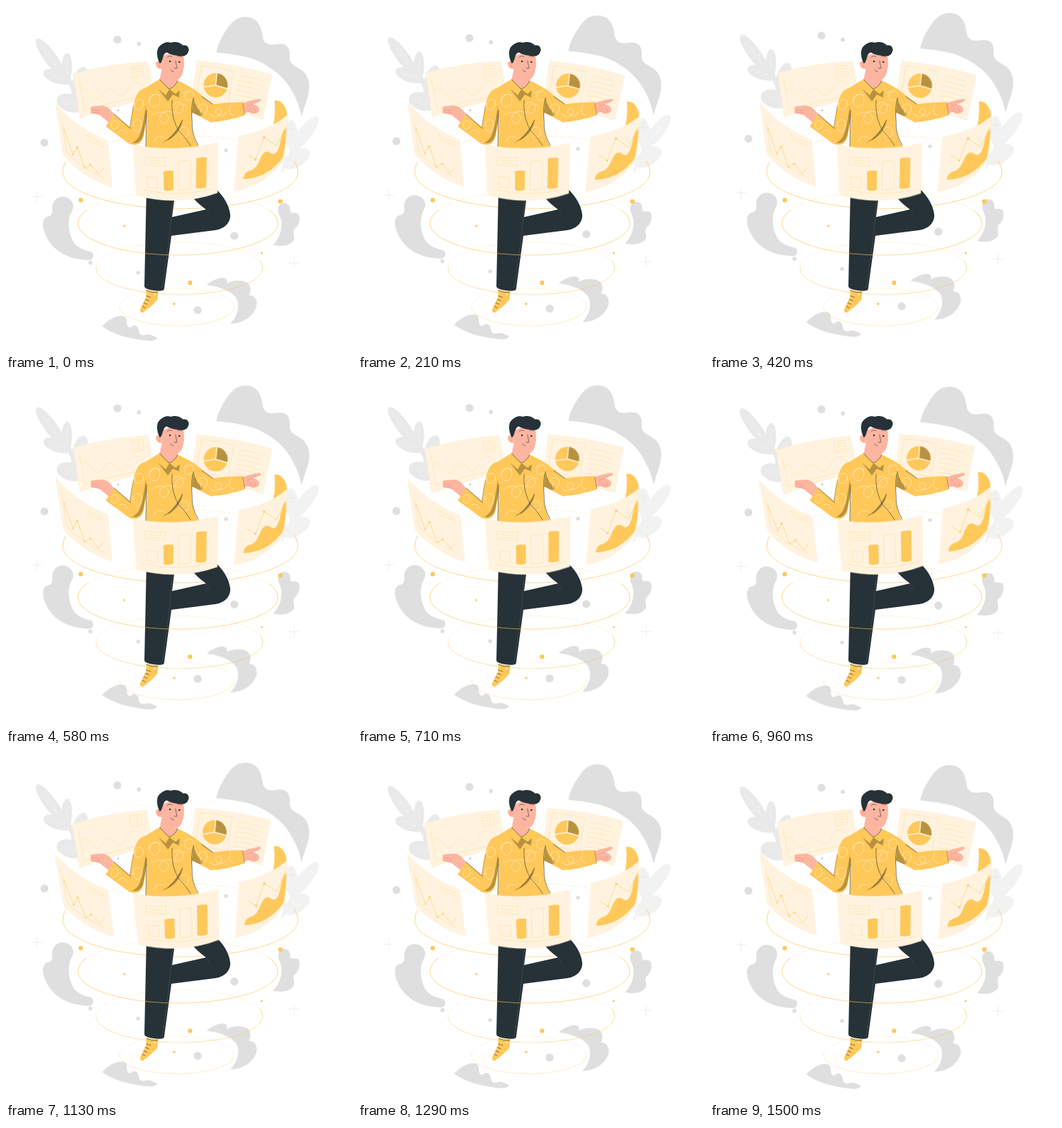
Animation, 500 px wide and 500 px high, one loop 1540 ms. Source, as an HTML page:

```html
<!DOCTYPE html>
<html lang="en">
<head>
<meta charset="utf-8">
<title>Floating data panels</title>
<style>
html, body { margin: 0; width: 100%; height: 100%; overflow: hidden; background: #fff; }
svg { display: block; width: 100vw; height: 100vh; fill: none; stroke-linecap: round; stroke-linejoin: round; }
.float { animation: float 770ms cubic-bezier(.37, 0, .63, 1) -65ms infinite alternate; }
.sway { transform-box: view-box; transform-origin: 239px 179px; animation: sway 770ms cubic-bezier(.37, 0, .63, 1) -470ms infinite alternate; }
@keyframes float { from { transform: translateY(.2px); } to { transform: translateY(-8.2px); } }
@keyframes sway { from { transform: rotate(-1.35deg); } to { transform: rotate(.7deg); } }
.gray { fill: #dfdfdf; }
.gold { fill: #ffc85a; }
.shade { fill: #b8923f; }
.dark { fill: #263238; }
.skin { fill: #fdb5a0; }
.crease { stroke: #e58f7c; stroke-width: .6; }
.cream { fill: #fff3e0; stroke: #ffe9c4; stroke-width: .5; }
.pale { stroke: #ffdf9f; stroke-width: .7; }
.rich { stroke: #ffcb66; stroke-width: .7; }
.ink { stroke: #263238; stroke-width: .6; }
.curl { stroke: #fff0cf; stroke-width: .7; }
.cross { stroke: #dedede; stroke-width: .5; }
.ring { stroke: #fac452; stroke-width: .65; }
.back { stroke: #ffe7bb; stroke-width: .5; stroke-dasharray: 14 3; }
</style>
</head>
<body>
<svg viewBox="0 0 500 500">
<defs>
  <g id="leaf">
    <path d="M0 2C-13-4-13-28-6-37Q0-43 6-37C13-28 13-4 0 2Z"/>
    <path d="M0 0V-33M0-12l-5-6M0-12l5-6M0-21l-4-5M0-21l4-5" stroke="#fff" stroke-width=".25"/>
  </g>
  <path id="plus" d="M-8 0H8M0-8V8" class="cross"/>
</defs>

<g class="float">
  <g fill="#e9e9e9">
    <use href="#leaf" transform="translate(84 102) rotate(-36) scale(.85 1.68)"/>
    <use href="#leaf" transform="translate(87 112) rotate(2) scale(.72 1.1)"/>
    <use href="#leaf" transform="translate(94 109) rotate(-71) scale(.9 1.05)"/>
    <use href="#leaf" transform="translate(99 132) rotate(18) scale(.95 1.15)"/>
    <use href="#leaf" transform="translate(114 146) rotate(-74) scale(1.2 1.05)"/>
    <path d="M78 88Q96 116 115 152" stroke="#e9e9e9" stroke-width="6"/>
  </g>
  <g fill="#f2f2f2">
    <use href="#leaf" transform="translate(412 209) rotate(38) scale(.9 1.55)"/>
    <use href="#leaf" transform="translate(413 207) rotate(-2) scale(.85 1.07)"/>
    <use href="#leaf" transform="translate(402 232) rotate(57) scale(1.1 1.07)"/>
    <path d="M418 200Q407 218 399 240" stroke="#f2f2f2" stroke-width="3"/>
  </g>
  <g class="gray">
    <path d="M304 67C306 54 314 40 323 28C332 16 345 13 357 18C367 23 370 35 371 46C374 56 382 57 393 55C407 53 411 62 410 75C410 86 421 87 430 95C439 104 440 117 436 131C433 142 429 151 427 160C424 142 416 125 404 109C392 94 371 80 349 74Q327 69 304 67Z"/>
    <path d="M82 275.5C94 276 101 287 95 297C88 310 90 327 97 340C102 350 115 353 123 355C128 358 127 366 121 367C100 367 80 361 66 345C54 330 49 311 58 305C70 303 66 297 67 288C69 280 75 275.5 82 275.5Z"/>
    <path d="M402 285C393 285 391 295 396 304C401 318 397 334 386 345C396 348 411 347 416 338C418 332 413 328 417 322C423 318 426 308 423 301C420 297 413 300 411 298C411 290 409 285 402 285Z"/>
    <path d="M290 403C297 397 308 392 315 393C320 394 320 398 319 401C326 396 341 395 349 400C355 406 354 412 351 418C359 417 364 425 362 434C358 447 344 459 324 459C335 448 339 432 332 421C323 410 306 405 290 403Z"/>
    <path d="M139 463C149 451 165 445 172 449C177 453 172 462 179 465C185 459 191 462 192 469C193 477 197 476 203 475C208 473 212 477 218.500 479C216 485 207 484 199 483C176 480 156 475 139 463Z"/>
    <circle cx="161" cy="48.500" r="5.800"/><circle cx="192" cy="54.500" r="2.900"/>
    <circle cx="55.500" cy="197.500" r="5.700"/><circle cx="318" cy="208.500" r="2.800"/>
    <circle cx="330" cy="332" r="5.800"/><circle cx="122" cy="371" r="2.900"/>
    <circle cx="191" cy="385.500" r="2.800"/><circle cx="277" cy="439.500" r="5.800"/>
  </g>
  <use href="#plus" x="44.500" y="275.500"/>
  <use href="#plus" x="416.500" y="371.500"/>
  <use href="#plus" x="412.500" y="178"/>
</g>

<g class="back">
  <path d="M82 240A170 53 0 0 1 422 240"/>
  <path d="M104 314A144.500 46 0 0 1 393 314"/>
  <path d="M130 379A120.500 38 0 0 1 371 379"/>
  <path d="M164 435A83 27 0 0 1 330 435"/>
</g>

<g class="sway">
  <path class="cream" d="M97 98Q150 84 205 80L214 132Q160 143 107 162Z"/>
  <g class="pale">
    <path d="M106 109L114 151Q155 137 201 131M110 122C118 112 124 134 132 134C142 134 141 119 150 120C158 121 158 131 166 130C176 129 175 110 186 110C193 109 196 113 200 117"/>
    <path d="M181 88L197 86L199 101L183 104ZM184 92l10-2M185 96l10-2M186 100l10-2"/>
  </g>
  <path class="cream" d="M276 79Q332 84 384 99L371 164Q322 147 268 140Z"/>
  <path class="pale" d="M283 86Q307 88 329 94L321 142Q300 137 275 134ZM337 101q17 1 32 7M335 108q17 1 32 7M334 115q17 1 32 7M333 122q17 1 32 7M332 129q17 1 32 7M330 136q17 1 25 5"/>
  <circle class="gold" cx="303" cy="114.500" r="17.500"/>
  <path class="shade" d="M303 114.500L305 97A17.500 17.500 0 0 1 319.500 119Z"/>
  <path d="M286 117L303 114.500L305 96.500M303 114.500L320 119.500" stroke="#fff3e0" stroke-width="1.500"/>
</g>

<path class="ring" d="M86 225Q82 232 82 240A170 53 0 0 0 422 240Q422 232 417 224"/>

<!-- person -->
<path class="dark" d="M203 265L200 405Q200 409 213 411Q228 413 228.500 409L239 332L302 324C317 322 325 312 324 301C322 286 314 275 304 265L262 268Q277 286 289 294L240 305L245 265Z"/>
<path d="M240.500 281Q236 345 226 407" stroke="#4b5a61" stroke-width=".5"/>
<path d="M289 295Q296 299 291 303" stroke="#46535a" stroke-width=".5"/>
<path class="gold" d="M203 410Q212 413 220 412L219 424Q212 433 198 443Q193 444 194 438L202 422Z"/>
<path class="ink" d="M203 419l6 2M201 424l6 2M199 429l5 2M197 434l4 2M203 411q8 4 16 3"/>
<circle cx="215" cy="417" r="1.200" fill="#fff2de"/>

<path class="skin" d="M158 159C151 149 146 144 138 144L124 145Q121 147 123 149L122 153Q122 156 126 155L136 158L148 168Z"/>
<path class="crease" d="M124 150L135 151M125 155l10-1"/>
<path class="skin" d="M340 141L352 137L366 134Q370 135 367 138L357 142Q365 144 366 149Q366 154 361 155Q356 157 351 153L341 156Z"/>
<path class="crease" d="M357 142L348 145M358 147l3 6M353 148l3 5M349 149l2 4"/>

<path class="gold" d="M218 108L202 118C190 121 187 130 184 145Q181 160 179 175L156 156L144 174L178 199C188 203 196 200 199 188L204 160L202 207H281C270 192 267 174 269 154L296 168Q321 166 345 158L342 139Q319 139 299 142L274 122Q267 117 251 109Z"/>
<path class="shade" d="M202 144C200 160 198 173 193 187Q190 194 182 198Q194 200 198 188Q202 171 203 158ZM271 132Q274 149 286 157L280 159L269 154ZM225 198C239 190 248 179 255 164C254 181 242 192 225 198Z"/>
<g class="curl">
  <path d="M205 138c4-16 20-12 17 0s-16 10-14-3c2-8 12-9 15-5M210 158c14-10 28-2 24 7s-16 3-11-6c4-8 16-9 22-3"/>
  <path d="M257 126c11-9 20 3 11 9s-15-7-5-10M240 146c2-10 18-9 16 2s-14 8-10-1c2-5 9-7 14-4M250 184c-2-12 14-12 14-2s-11 10-12 1"/>
  <path d="M189 136c8-5 14 7 6 12s-12-4-7-9M183 173c1-13 15-11 13 1s-13 9-11-2M151 170c8-10 16 0 9 6s-10-3-6-6M161 184q8-10 14 0"/>
  <path d="M278 148c2-12 16-7 12 3s-12 5-8-2M294 156q12 11 17-3c1-7-8-6-8 0s12 8 18-2M325 143q-7 12 5 15M213 196q6-12 14-6"/>
</g>
<path class="ink" d="M203 151L202 205M271 132Q267 146 269 167Q268 186 278 201M156 156L180 177M240 136Q238 164 251 182Q261 192 267 202M235 193Q248 181 255 165M299 142L283 131"/>
<path d="M184 145Q181 160 179 176M342 140l3 17" stroke="#8c7130" stroke-width=".6"/>

<path class="skin" d="M225 92L222 107Q228 112 234 120Q242 118 248 109V98Z"/>
<path class="gold" d="M222 106L217 109L222 120L231 129L236 120Q229 114 222 106ZM236 120Q244 117 248 108L254 114L250 128Z"/>
<path class="shade" d="M231 129L236 120L245 127L251 122L250 132L241 128L234 138L220 120Z"/>
<path class="ink" d="M222 106Q229 114 236 120Q245 116 248 108" stroke-width=".5"/>
<path class="skin" d="M225 74Q237 65 256 71C259 82 257 94 253 102Q249 108 241 107C232 106 227 98 225 91C219 92 215 86 217 81Q220 78 225 82Z"/>
<path class="dark" d="M222 83C217 72 217 63 222 58C227 54 231 51 238 53C247 50 253 54 256 57C263 55 266 63 263 67C261 73 254 73 249 72Q239 71 232 67C227 69 227 76 224 82Z"/>
<circle class="dark" cx="237" cy="80" r="1.300"/><circle class="dark" cx="250.500" cy="81" r="1.300"/>
<path class="ink" d="M233 74Q236 71 240 73M248 73Q252 71 254 74M238 92Q239 95 242 95" stroke-width="1"/>
<path class="ink" d="M245 79Q246 85 247 90L243 90"/>
<path class="crease" d="M219 83Q222 83 222 88"/>
<circle class="dark" cx="162" cy="151" r=".700"/>

<g class="sway">
  <path class="cream" d="M72 142Q104 178 147 195L153.500 262Q109 247 83 216Z"/>
  <path class="pale" d="M80 164L88 212Q112 236 142 249M114 186Q127 194 140 199M119 194Q129 199 141 203"/>
  <path class="rich" d="M84 179L97 215L103 204L114 234L122 229L134 243L141 235"/>
  <g class="gold">
    <circle cx="84" cy="179" r="1"/><circle cx="97" cy="215" r="1"/><circle cx="103" cy="204.500" r="1.400"/>
    <circle cx="114" cy="234" r="1"/><circle cx="122" cy="229" r="1.300"/>
    <path d="M388 137C398 134 408 148 405.500 161L386 174Q390 154 388 137Z"/>
  </g>
  <path class="cream" d="M337 188Q378 181 406 158Q407 190 401 222Q375 260 330 267Z"/>
  <path class="gold" d="M343 250C345 238 351 239 357 236C366 231 366 217 374 211C382 207 384 219 391 211C398 202 396 183 405 176Q405 199 400 219C385 239 367 249 343 250Z"/>
  <path class="rich" d="M348 214L360.500 222L373 190L391 202L404 174"/>
  <circle class="gold" cx="360.500" cy="222" r="1.500"/><circle class="gold" cx="373" cy="190" r="1.700"/>

  <path class="cream" d="M184 201Q245 212 306 198L305.500 270Q250 290 189 274Z"/>
  <g class="pale">
    <path d="M201 218Q215 221 230 219.500V231.500Q215 232 202 230ZM207 223q9 2 18 1M207 227q9 2 16 1"/>
    <path d="M204 246Q211 249 219 247.500V263Q211 263 205 261ZM250 225Q258 222 267 224V264Q258 266 250 266Z"/>
    <path d="M196 265Q247 278 298 264"/>
  </g>
  <g class="gold">
    <path d="M227.500 239Q235 237 242 238V265.500Q235 268 228 266Z"/>
    <path d="M275 220Q282 217.500 290 219L289.500 262Q282 265 274.500 263Z"/>
  </g>
</g>

<g class="ring">
  <path d="M116 295Q104 304 104 314A144.500 46 0 0 0 393 314Q393 304 381 295"/>
  <path d="M130 379A120.500 38 0 0 0 371 379Q371 373 367 367" opacity=".750"/>
  <path d="M164 435A83 27 0 0 0 330 435" opacity=".500" stroke-dasharray="22 2"/>
</g>
<g class="gold">
  <circle cx="108" cy="280.500" r="3.200"/><circle cx="396.500" cy="282.500" r="3.300"/>
  <circle cx="171" cy="318" r="1.600"/><circle cx="369.500" cy="357" r="1.600"/>
  <circle cx="266" cy="400" r="3.200"/><circle cx="243" cy="430.500" r="1.700"/>
</g>
</svg>
</body>
</html>
```
